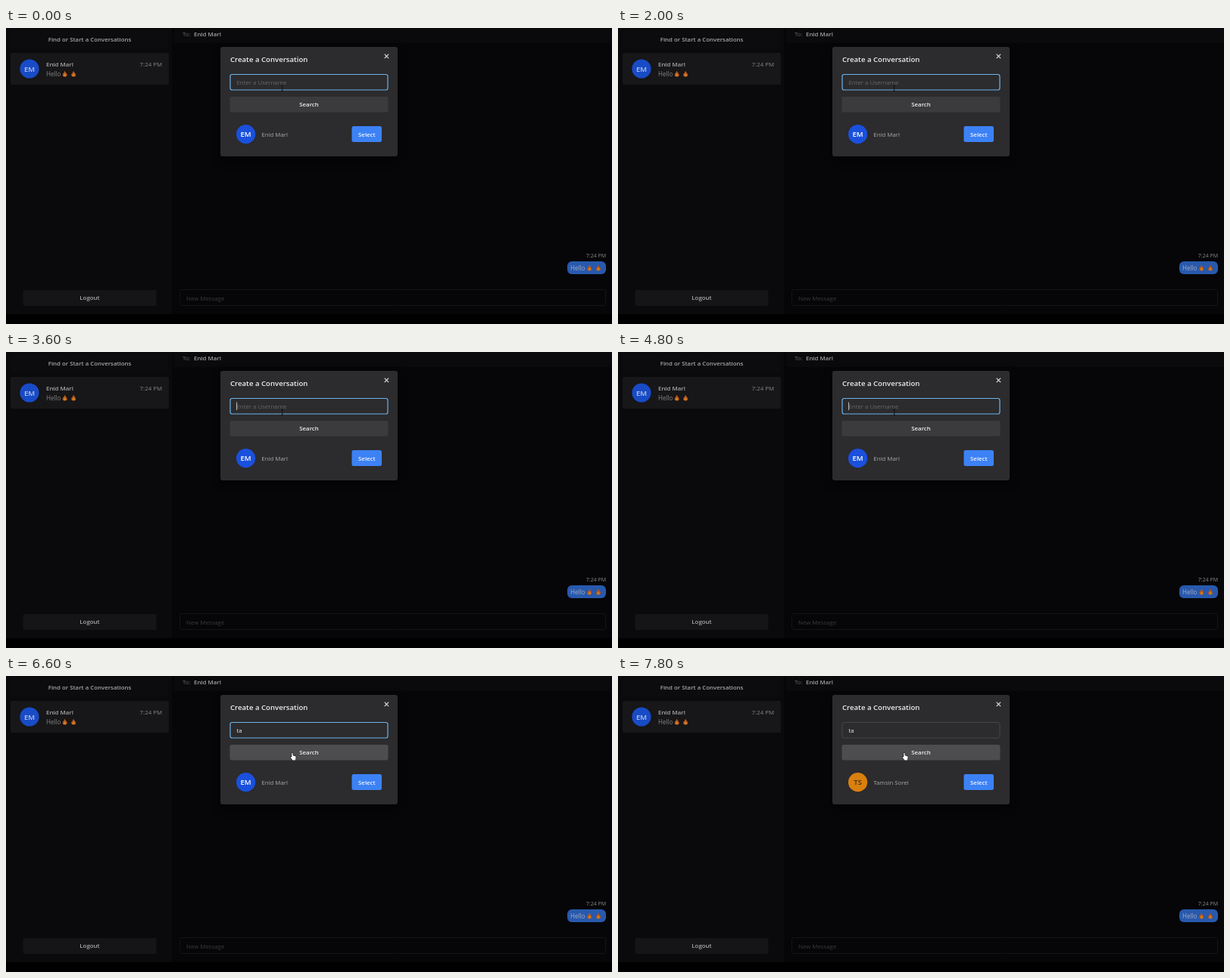
Animation, 800 px wide and 392 px high, one loop 8 s. Source, as an HTML page with a canvas:

```html
<!DOCTYPE html>
<html lang="en">
<head>
<meta charset="utf-8">
<title>Create a Conversation</title>
<style>
html, body { margin: 0; width: 100%; height: 100%; overflow: hidden; background: #000; }
canvas { display: block; width: 800px; height: 392px; }
</style>
</head>
<body>
<canvas id="stage"></canvas>
<script>
const W = 800, H = 392, LOOP = 8000;
const FONT = '"Open Sans", "Noto Sans", sans-serif';
const BASE = 7.85;

// Timeline in ms
const KEY_T = 5500, KEY_A = 5750;
const MOVE_START = 5850, MOVE_END = 6250;
const LOAD = 6700, DONE = 7700;
const BLINK = 1060, BLINK_START = 370;

const FRIEND = { name: 'Enid Marl', initials: 'EM', color: '#1a50dd', ink: '#fff' };
const FOUND = { name: 'Tamsin Sorel', initials: 'TS', color: '#d9800f', ink: '#42300f' };

const canvas = document.getElementById('stage');
const ctx = canvas.getContext('2d');
const dpr = window.devicePixelRatio || 1;
canvas.width = W * dpr;
canvas.height = H * dpr;

function box(x, y, w, h, r, fill, stroke, line = 1) {
  ctx.beginPath();
  ctx.roundRect(x, y, w, h, r);
  if (fill) { ctx.fillStyle = fill; ctx.fill(); }
  if (stroke) { ctx.strokeStyle = stroke; ctx.lineWidth = line; ctx.stroke(); }
}

function text(str, x, y, color, { size = BASE, weight = 400, align = 'left' } = {}) {
  ctx.font = `${weight} ${size}px ${FONT}`;
  ctx.textAlign = align;
  ctx.fillStyle = color;
  ctx.fillText(str, x, y);
}

function line(color, width, ...points) {
  ctx.beginPath();
  points.forEach(([x, y], i) => i ? ctx.lineTo(x, y) : ctx.moveTo(x, y));
  ctx.strokeStyle = color;
  ctx.lineWidth = width;
  ctx.stroke();
}

function disc(x, y, r, fill) {
  ctx.beginPath();
  ctx.arc(x, y, r, 0, Math.PI * 2);
  ctx.fillStyle = fill;
  ctx.fill();
}

function avatar(x, y, person, color = person.color, ink = person.ink) {
  disc(x, y, 12.6, color);
  text(person.initials, x, y + 3.5, ink, { size: 9.6, weight: 600, align: 'center' });
}

function drop(x, y, s, color) {
  ctx.beginPath();
  ctx.moveTo(x - 0.3 * s, y - 4.2 * s);
  ctx.bezierCurveTo(x + 0.6 * s, y - 2 * s, x + 3.2 * s, y - 0.6 * s, x + 3 * s, y + 1.6 * s);
  ctx.bezierCurveTo(x + 2.8 * s, y + 4.4 * s, x - 2.8 * s, y + 4.4 * s, x - 3 * s, y + 1.6 * s);
  ctx.bezierCurveTo(x - 3.1 * s, y - 0.4 * s, x - 0.4 * s, y - 1.4 * s, x - 0.3 * s, y - 4.2 * s);
  ctx.fillStyle = color;
  ctx.fill();
}

function flame(x, y) {
  drop(x, y, 1, '#b4551c');
  drop(x, y + 1.2, 0.55, '#cc8526');
}

function drawPage() {
  ctx.fillStyle = '#060508';
  ctx.fillRect(0, 0, W, 379);
  ctx.fillStyle = '#0a090b';
  ctx.fillRect(0, 0, 219, 379);
  ctx.fillRect(222, 0, 578, 20);
  ctx.fillStyle = '#000';
  ctx.fillRect(0, 379, W, 13);

  box(6, 2, 208, 25, 3, '#0c0b0d');
  text('Find or Start a Conversations', 110.5, 17.5, '#a6a6a6', { weight: 600, align: 'center' });

  box(6, 33, 209, 42, 2, '#171618');
  avatar(31, 54, FRIEND, '#184bc6', '#b9c5e6');
  text(FRIEND.name, 53, 51, '#a8a8a8', { weight: 600 });
  text('7:24 PM', 206, 51, '#858585', { align: 'right' });
  text('Hello', 53, 63.7, '#858585', { size: 8.1 });
  flame(77.7, 60.8);
  flame(89.2, 60.8);

  box(22.5, 347, 176, 21, 2, '#151416');
  text('Logout', 110.5, 360.3, '#aaa', { weight: 600, align: 'center' });

  text('To:', 233, 11.3, '#666');
  text(FRIEND.name, 248, 11.3, '#a2a2a2', { weight: 600 });

  text('7:24 PM', 792, 304.4, '#888', { size: 7, align: 'right' });
  box(741, 309, 51, 17, 6, '#2859ad');
  text('Hello', 745, 320.5, '#a4adbd', { size: 8.1 });
  flame(770.3, 317.8);
  flame(782, 317.8);

  box(229.5, 346.5, 562, 21, 2, null, '#141316');
  text('New Message', 238, 360.5, '#3b3b3d');
}

function caretOn(t) {
  if (t < KEY_T) return ((t - BLINK_START + BLINK) % BLINK) < BLINK / 2;
  const since = t - (t < KEY_A ? KEY_T : KEY_A);
  return since % BLINK < BLINK / 2;
}

function drawInput(t) {
  const typed = t < KEY_T ? '' : t < KEY_A ? 't' : 'ta';
  if (t < LOAD) box(296, 61.5, 208, 20.5, 2.5, null, '#69b4ef', 1.2);
  else box(296, 61.5, 208, 20.5, 2.5, null, '#49494b', 0.9);

  if (typed) text(typed, 304.5, 74.8, '#ececec');
  else text('Enter a Username', 304.5, 74.8, '#68686a');

  if (t < LOAD && caretOn(t)) {
    ctx.font = `400 ${BASE}px ${FONT}`;
    const x = 304.6 + ctx.measureText(typed).width;
    line('#e8e8e8', 0.8, [x, 66.5], [x, 77]);
  }
}

function drawSpinner(t) {
  const start = -Math.PI * 0.85 + (t - 7400) / 450 * Math.PI * 2;
  ctx.beginPath();
  ctx.arc(400, 101.2, 4.2, start, start + Math.PI * 0.95);
  ctx.strokeStyle = '#858587';
  ctx.lineWidth = 1;
  ctx.stroke();
}

function drawModal(t, hover) {
  const loading = t >= LOAD && t < DONE;
  ctx.save();
  ctx.shadowColor = 'rgba(0,0,0,.75)';
  ctx.shadowBlur = 12 * dpr;
  ctx.shadowOffsetY = 4 * dpr;
  box(283, 25, 234, loading ? 99 : 145, 3, '#2c2b2d');
  ctx.restore();

  text('Create a Conversation', 296, 45, '#efefef', { size: 9.6, weight: 600 });
  line('#e6e6e6', 1.1, [499.7, 34.7], [505.1, 40.1]);
  line('#e6e6e6', 1.1, [505.1, 34.7], [499.7, 40.1]);
  drawInput(t);

  box(295.5, 91, 209, 20.5, 2.5, loading ? '#343335' : hover ? '#4d4c4e' : '#3b3a3c');
  if (loading) {
    drawSpinner(t);
    return;
  }
  text('Search', 400, 104.2, '#f0f0f0', { weight: 600, align: 'center' });

  const person = t >= DONE ? FOUND : FRIEND;
  avatar(316.6, 140.7, person);
  text(person.name, 337.3, 143.8, '#aaaaac');
  box(456.5, 130, 39.5, 21, 2.5, '#3c82f5');
  text('Select', 476.3, 143.8, '#f2f6ff', { weight: 600, align: 'center' });
}

function outline(points) {
  ctx.beginPath();
  points.forEach(([x, y]) => ctx.lineTo(x, y));
  ctx.closePath();
  ctx.lineJoin = 'round';
  ctx.strokeStyle = '#111';
  ctx.lineWidth = 1.2;
  ctx.stroke();
  ctx.fillStyle = '#fff';
  ctx.fill();
}

const pointers = {
  beam() {
    line('#0b0b0c', 0.9, [0, -3.5], [0, 3.5]);
    line('#0b0b0c', 0.7, [-1.2, -3.5], [1.2, -3.5]);
    line('#0b0b0c', 0.7, [-1.2, 3.5], [1.2, 3.5]);
  },
  arrow() {
    outline([[0, 0], [0, 8], [1.8, 6.4], [3, 9], [4.2, 8.4], [3, 6], [5.4, 5.8]]);
  },
  hand() {
    outline([[-0.8, 0], [0.5, 0], [0.7, 3.3], [4.2, 4.2], [4.7, 5.2],
      [4.1, 9.4], [0.3, 9.4], [-2.4, 5.7], [-1.8, 4.9], [-0.7, 5.6]]);
  },
  blocked() {
    disc(0, 3, 3.8, '#231717');
    disc(0, 3, 3.2, '#f1dfd9');
    ctx.beginPath();
    ctx.arc(0, 3, 2.7, 0, Math.PI * 2);
    ctx.strokeStyle = '#c4412f';
    ctx.lineWidth = 1;
    ctx.stroke();
    line('#c4412f', 1, [-1.9, 1.1], [1.9, 4.9]);
  }
};

function pointerAt(t) {
  const p = Math.min(1, Math.max(0, (t - MOVE_START) / (MOVE_END - MOVE_START)));
  const e = p * p * (3 - 2 * p);
  return [364.7 + 13.3 * e, 80 + 22 * e];
}

function draw(t) {
  const [x, y] = pointerAt(t);
  const hover = y >= 91;
  ctx.setTransform(dpr, 0, 0, dpr, 0, 0);
  drawPage();
  drawModal(t, hover);

  const loading = t >= LOAD && t < DONE;
  const kind = loading ? 'blocked' : hover ? 'hand' : y > 82 ? 'arrow' : 'beam';
  ctx.translate(x, y);
  pointers[kind]();
}

function tick() {
  draw(performance.now() % LOOP);
  requestAnimationFrame(tick);
}
tick();
</script>
</body>
</html>
```
